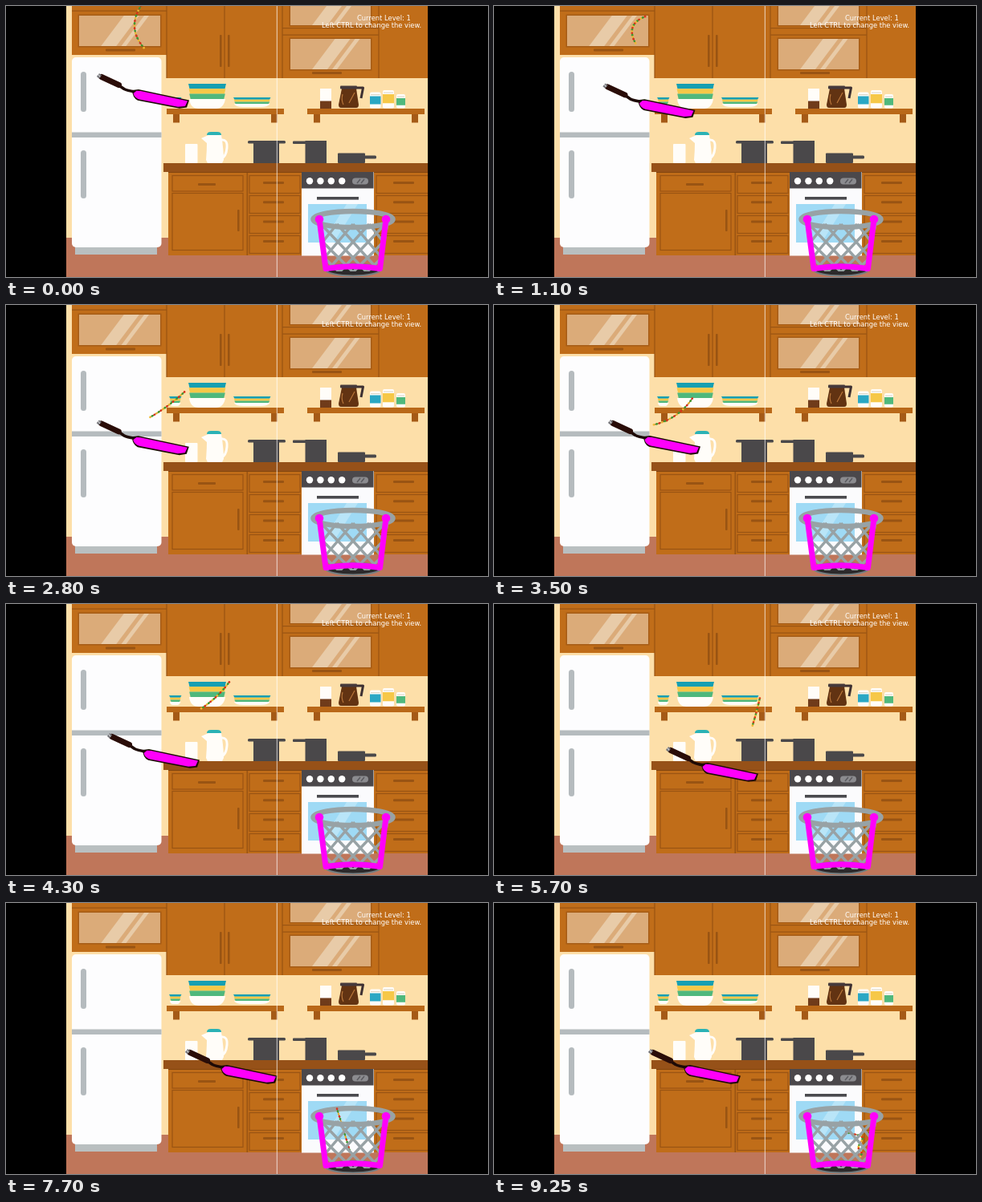
Animation of 600x338 px, one loop 9300 ms. Source, as an HTML page:

```html
<!DOCTYPE html>
<html lang="en">
<head>
<meta charset="utf-8">
<title>Kitchen toss</title>
<style>
  html, body { margin: 0; width: 100%; height: 100%; overflow: hidden; background: #000; }
  svg { display: block; width: 100%; height: 100%; }
  text { font-family: "DejaVu Sans", sans-serif; font-size: 8.36px; fill: #fff; }
</style>
</head>
<body>
<svg id="stage" viewBox="0 0 600 338"></svg>
<script>
const LOOP = 9300, STEP = 50;
const WOOD = '#c06d19', EDGE = '#995413', WHITE = '#fffdf9', GREY = '#b5bbbe', DARK = '#4a484a';
const MESH = '#98a2a5', PINK = '#ff00fa', TEAL = '#169fb2', YELLOW = '#f6c848', GREEN = '#4fb87c';

const repeat = (n, make) => Array.from({ length: n }, (_, i) => make(i)).join('');
const rect = (x, y, w, h, fill, rx = 0) =>
  `<rect x="${x}" y="${y}" width="${w}" height="${h}" fill="${fill}" rx="${rx}"/>`;
const box = (x, y, w, h) =>
  `<rect x="${x}" y="${y}" width="${w}" height="${h}" fill="none" stroke="${EDGE}" stroke-width="1.2"/>`;
const shape = (d, fill) => `<path d="${d}" fill="${fill}"/>`;
const line = (d, color, w, cap = 'butt') =>
  `<path d="${d}" fill="none" stroke="${color}" stroke-width="${w}" stroke-linecap="${cap}" stroke-linejoin="round"/>`;
const bar = (x, y, w) => rect(x, y, w, 3, EDGE, 1);
const post = (x, y, h) => rect(x, y, 2.6, h, EDGE, 1);

function glass(x, y, w, h) {
  const slant = h * 0.75;
  const band = (a, b) => shape(`M${x + a} ${y + h}l${slant} ${-h}h${b}l${-slant} ${h}z`, '#e8cba8');
  return rect(x - 1.5, y - 1.5, w + 3, h + 3, '#a65c16') + rect(x, y, w, h, '#dbab79') +
    band(w * 0.27, 19) + band(w * 0.52, 6);
}

function upperCabinets() {
  const rails = [27, 35.5].map(y => rect(344, y, 120, 1.2, EDGE)).join('');
  return rect(82, 0, 118, 61, WOOD) + rect(82, 5.5, 118, 1.2, EDGE) + bar(124, 53.5, 37) + glass(91, 12, 101, 38) +
    rect(200, 0, 325, 90, WOOD) + [199.4, 271.4, 343.4, 463.4].map(x => rect(x, 0, 1.2, 90, EDGE)).join('') +
    post(266, 36, 40) + post(276, 36, 40) + rails +
    glass(354, -14, 100, 38) + glass(354, 41, 100, 38) + bar(381, 82, 37);
}

function fridge() {
  return rect(86, 299, 102, 11, '#b9bfc0') + rect(82, 64, 111.5, 237, '#fdfdfe', 5) +
    rect(82, 157.5, 111.5, 6.5, GREY) + rect(93, 82, 7, 50, GREY, 3.5) + rect(93, 180, 7, 60, GREY, 3.5);
}

function shelf(x) {
  return rect(x + 8, 134, 8, 11.5, '#a55a16') + rect(x + 130, 134, 8, 11.5, '#a55a16') + rect(x, 128, 146, 7, '#b96818');
}

function dishes(x, w, y, band, depth) {
  const stripes = [TEAL, YELLOW, GREEN].map((color, i) =>
    shape(`M${x + i * 0.6} ${y + band * i}h${w - i * 1.2}l-1.5 ${band}h${i * 1.2 + 3 - w}z`, color)).join('');
  return stripes + shape(`M${x + 1} ${y + band * 3}h${w - 2}q-2 ${depth} ${-w * 0.25} ${depth}` +
    `h${2 - w * 0.5}q${-w * 0.22} 0 ${-w * 0.25} ${-depth}z`, WHITE);
}

const jar = (x, y, w, label) =>
  rect(x, y, w, 127.5 - y, WHITE, 2) + rect(x, y + 5, w, (127.5 - y) * 0.5, label) +
  rect(x + 1, y + 2.6, w - 2, 1, '#d9d3c4');

function shelves() {
  return shelf(200) + shelf(375) +
    dishes(203, 15.5, 114, 2.7, 4) + dishes(227, 47, 97, 6.3, 12) + dishes(283, 46.5, 114, 2.7, 4) +
    rect(391, 103, 14, 25, WHITE) + rect(391, 118.5, 14, 9.5, '#703b1a') +
    line('M436 102h8.500l-2.500 13', '#3d3032', 3) +
    shape('M418 103h18l3 20q0 4-3 4h-19q-3 0-3-4z', '#623312') + rect(416, 99.5, 21, 4, '#463a3c', 1) +
    line('M419 110q-2 7 1 13M434 108l-7 13', '#b9763a', 1.2) +
    jar(453, 107.5, 13.5, '#2aa7c4') + jar(469, 105, 14, YELLOW) + jar(486, 110, 11, GREEN);
}

const drawers = (x, w, hx) =>
  repeat(4, i => box(x, 211.5 + 25 * i, w, 22) + bar(hx, 219 + 24.3 * i, 26));

function counter() {
  return rect(202, 206, 323, 105, WOOD) +
    box(207, 211.5, 88, 19.5) + bar(239, 221, 22) + box(207, 233.5, 88, 71) + post(288, 254, 27) +
    rect(299.5, 207, 1.6, 104, EDGE) + drawers(303, 63, 320) + drawers(461, 66, 482) +
    rect(202, 206, 323, 2, '#82450f') + rect(196, 196, 329, 11, '#965118');
}

function oven() {
  return rect(368, 207, 90, 104.5, '#fbfbfd') + rect(368, 207, 89.5, 20.5, '#4b484b') +
    repeat(4, i => `<circle cx="${378 + 13.4 * i}" cy="218.3" r="4.2" fill="#fff"/>`) +
    rect(431, 214.5, 20, 8, '#8b8b8f', 4) + line('M437 221l4-5M442 221l4-5', '#5c5b60', 1.5) +
    rect(387, 238, 52, 3.6, '#4a4a4e') + rect(376, 247, 73, 48, '#9fdaf5') +
    shape('M394 295l30-48h14l-30 48z', '#b9e5f8');
}

function cookware() {
  return rect(223, 172, 15.5, 24, WHITE, 1) + line('M268 167q8-1 7 10t-7 13', WHITE, 3) +
    shape('M243 165l9-4h16q3 18 3 31l-2 4h-18l-2-4q1-12 1-21z', WHITE) +
    shape('M250 161q0-4 5-4h8q5 0 5 4z', '#2bb2b5') +
    rect(301, 168, 47, 3.5, DARK, 1.5) + rect(308, 168, 32, 28, DARK) +
    rect(357, 168.5, 18, 3.5, DARK, 1) + rect(372.5, 168, 26.5, 28, DARK) +
    rect(445, 186.5, 16, 4, DARK, 1.5) + rect(413, 183.5, 34, 12.5, DARK, 1);
}

function panShape() {
  return line('M139 98l8 5.500q4 2 13 3.500', '#1d0a06', 3.6, 'round') +
    line('M119 88.500l21.500 10', '#2a0d08', 7, 'round') +
    line('M114.500 86l3 2.500', '#77777c', 5) + line('M115 85.500l2 3', '#eee', 1) +
    shape('M157 105l8-1 63 13.500-3 9-9 1.300-52-10q-6.500-3-7-12.800z', '#1d0a06') +
    shape('M158.500 109l4-3.300 5 .3 58.500 12.500-3 6.500-9 .8-48-9.300q-6-2-7.500-7.500z', PINK);
}

const rim = sweep => line(`M382.500 266a49.500 10 0 0 ${sweep} 99 0`, MESH, 6.5);

function basketFront() {
  const strand = i => [-1, 1].map(side =>
    `M${432 + side * 20 * i} 272L${432 + side * 17 * (i + 3)} 332`).join('');
  const knob = x => `<circle cx="${x}" cy="266" r="5.300" fill="${PINK}"/>`;
  return '<clipPath id="net"><path d="M387 270L399 331H465L477 270z"/></clipPath>' +
    `<ellipse cx="432" cy="329" rx="34" ry="7.500" fill="#2c2a2b" stroke="#767f82" stroke-width="2"/>` +
    `<g clip-path="url(#net)">${line(repeat(8, i => strand(i - 5)), MESH, 3.4)}</g>` + rim(0) +
    line('M390 266L398 327.500Q432 322 465.500 327.500L473 266', PINK, 7, 'round') + knob(390) + knob(473);
}

const BEADS = 18, HUES = ['#dc321a', '#3f9a2e', '#efb934'];
document.getElementById('stage').innerHTML =
  rect(0, 0, 600, 338, '#000') + rect(75, 0, 450, 338, '#fddfa9') + rect(75, 289, 450, 49, '#bf765a') +
  upperCabinets() + fridge() + shelves() + counter() + oven() + cookware() + rim(1) +
  '<path id="cord" fill="none" stroke="#7d5524" stroke-width="1.2"/><g id="beads">' +
  repeat(BEADS, i => `<circle r="1.35" fill="${HUES[i % 3]}"/>`) + '</g>' +
  basketFront() + `<g id="pan">${panShape()}</g>` + rect(336.8, 0, 1, 338, 'rgba(255,255,255,.72)') +
  '<text x="437" y="18">Current Level: 1</text><text x="393" y="26.6">Left CTRL to change the view.</text>' +
  rect(0, 0, 75, 338, '#000') + rect(525, 0, 75, 338, '#000');

const ease = (from, to, t) => {
  const u = Math.max(0, Math.min(1, (t - from) / (to - from)));
  return u * u * (3 - 2 * u);
};

// Stops of the pan: seconds, x, y
const STOPS = [
  [0, 0, 0], [1, 24, 12], [1.9, -21, 21], [2.15, -15, 15], [2.85, 0, 60], [3.5, 29, 59],
  [4.3, 13, 77], [5.1, 30, 126], [5.7, 101, 94], [7.7, 110, 98], [9.25, 79, 98]
];

function panAt(t) {
  const pos = [0, 0];
  for (let i = 1; i < STOPS.length; i++) {
    const a = STOPS[i - 1], b = STOPS[i], u = ease(a[0], b[0], t);
    pos[0] += (b[1] - a[1]) * u;
    pos[1] += (b[2] - a[2]) * u;
  }
  return pos;
}

// The cord falls, bounces off the pan, flies in an arc and settles in the basket
const BOUNCE = 3.1, LAND = 7.7;

function cordAt(t) {
  const air = Math.min(t, LAND), settle = ease(LAND, 8.5, t), since = Math.max(0, air - BOUNCE);
  const x = 170 + 11 * Math.min(air, BOUNCE) + 47 * since + 27 * settle;
  const y = (since ? 112.5 + 17.6 * (air - 4.58) ** 2 : 22 + 18.5 * (air - 0.45) ** 2) + 17 * settle;
  const angle = (66 + 80 * Math.exp(-((air - 3.3) ** 2) / 8)) * Math.PI / 180;
  const half = 23 + 6 * Math.cos((t - 3.4) * Math.PI / 2);
  const bend = (10 - 19 * ease(2.4, BOUNCE, t)) * Math.exp(-1.2 * since) - 10 * settle;
  const c = Math.cos(angle), s = Math.sin(angle);
  return i => {
    const u = 2 * i / (BEADS - 1) - 1, along = half * u;
    const across = bend * (1 - u * u) + 4 * settle * Math.sin(5 * u);
    return [x + along * c - across * s, y + along * s + across * c];
  };
}

const pan = document.getElementById('pan'), cord = document.getElementById('cord');
const beads = [...document.getElementById('beads').children];

function draw(ms) {
  const t = Math.floor(ms % LOOP / STEP) * STEP / 1000, place = cordAt(t);
  pan.setAttribute('transform', `translate(${panAt(t)})`);
  cord.setAttribute('d', 'M' + beads.map((bead, i) => {
    const [x, y] = place(i);
    bead.setAttribute('cx', x);
    bead.setAttribute('cy', y);
    return `${x} ${y}`;
  }).join('L'));
}

const start = performance.now();
function tick() {
  draw(performance.now() - start);
  requestAnimationFrame(tick);
}
tick();
</script>
</body>
</html>
```
